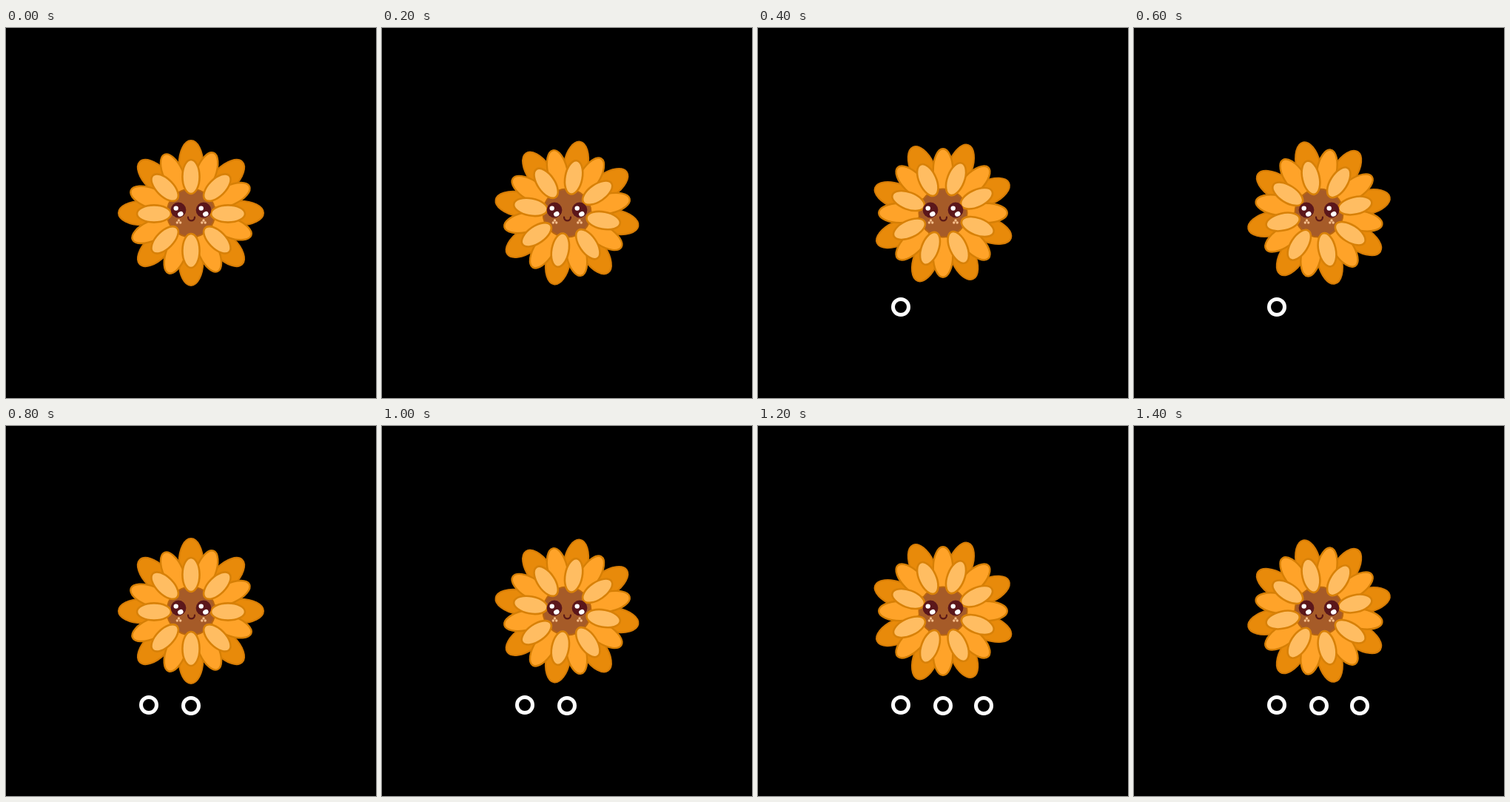
An HTML page that plays this animation: 500 px wide and 500 px high, repeating every 1.6 s.

```html
<!DOCTYPE html>
<html lang="en">
<head>
<meta charset="utf-8">
<title>Flower loader</title>
<style>
html, body { margin: 0; width: 100%; height: 100%; overflow: hidden; background: #000; }
svg { display: block; width: 100vw; height: 100vh; }
</style>
</head>
<body>
<svg viewBox="0 0 500 500">
  <g id="outer" fill="#e88a0a" stroke="#d67c05" stroke-width="2"></g>
  <g id="middle" fill="#ffa329" stroke="#d67f05" stroke-width="2.4"></g>
  <circle cx="250" cy="250" r="32.5" fill="#a65b28" stroke="#b9660f" stroke-width="2"/>
  <g id="inner" fill="#ffbd62" stroke="#d88108" stroke-width="2.6"></g>
  <g id="face"></g>
  <path d="M246 255.5C246 262 255 262 255 255.5" fill="none" stroke="#5c1916" stroke-width="2.2" stroke-linecap="round"/>
  <g id="rings" fill="none" stroke="#fff" stroke-width="5">
    <circle cx="193" cy="377" r="10.5"/>
    <circle cx="250" cy="378" r="10.5"/>
    <circle cx="305" cy="378" r="10.5"/>
  </g>
</svg>
<script>
const $ = id => document.getElementById(id);
const STEP = 200, STEPS = 8;
const turns = [0, 10.5, 20.5, 32.3];

function addPetals(id, cy, dist, rx, ry) {
  for (let a = 0; a < 360; a += 45) {
    $(id).innerHTML += `<ellipse cx="250" cy="${cy - dist}" rx="${rx}" ry="${ry}" transform="rotate(${a} 250 ${cy})"/>`;
  }
}
addPetals("outer", 250, 66, 16.3, 32);
addPetals("middle", 250, 58, 13.3, 28.8);
addPetals("inner", 251, 50, 11.6, 23);

// One eye with its highlights and the cheek dots below it
const side = (x, cheek) => `
  <circle cx="${x}" cy="246" r="10.4" fill="#5b171b"/>
  <circle cx="${x - 3.3}" cy="243.6" r="3.2" fill="#fff"/>
  <ellipse cx="${x + 2.8}" cy="251.3" rx="3.9" ry="3.2" fill="#fff" transform="rotate(-25 ${x + 2.8} 251.3)"/>
  <g fill="#f5be8c">
    <circle cx="${cheek}" cy="260" r="1.7"/>
    <circle cx="${cheek - 2.2}" cy="263" r="1.7"/>
    <circle cx="${cheek + 2.2}" cy="263" r="1.7"/>
  </g>`;
$("face").innerHTML = side(233, 233.5) + side(267, 267);

const rotate = (id, a, cy) => $(id).setAttribute("transform", `rotate(${a} 250 ${cy})`);
const start = performance.now();

function draw(now) {
  const step = Math.floor(Math.max(0, now - start) / STEP) % STEPS;
  const turn = turns[step % 4];
  rotate("outer", turn, 250);
  rotate("middle", turns[(step + 2) % 4], 250);
  rotate("inner", turn, 251);
  [...$("rings").children].forEach((ring, i) => {
    ring.style.display = step >= 2 * (i + 1) ? "" : "none";
  });
  requestAnimationFrame(draw);
}
draw(start);
</script>
</body>
</html>
```
